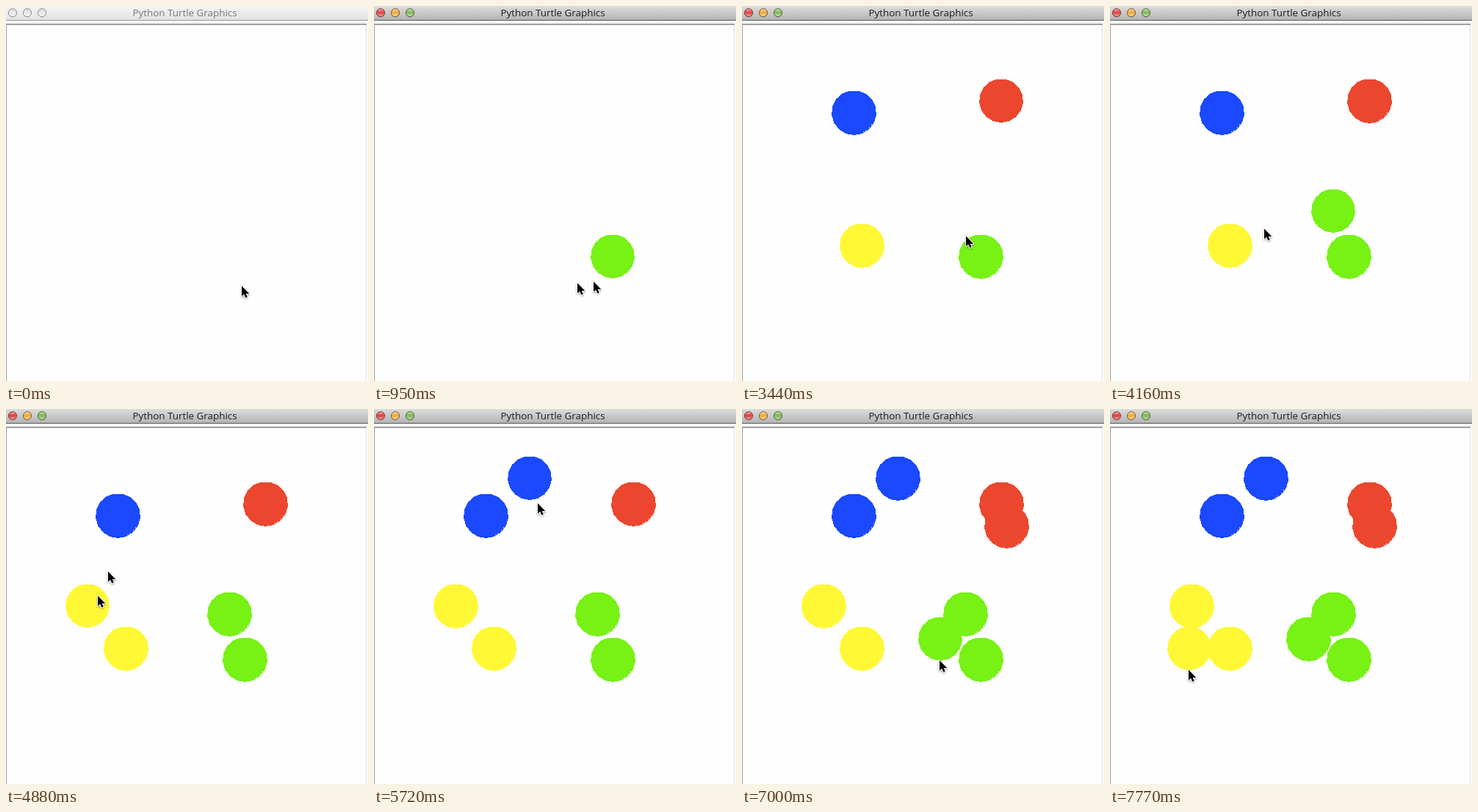
Animation of 493 by 511 pixels, one loop 8000 ms. Source, as an HTML page:

```html
<!DOCTYPE html>
<html lang="en">
<head>
<meta charset="utf-8">
<title>Python Turtle Graphics</title>
<style>
  html, body { margin: 0; width: 100%; height: 100%; overflow: hidden; background: #fefefe; }
  svg { display: block; }
  text { font: 13.4px "Open Sans", "Noto Sans", sans-serif; }
  #dots { shape-rendering: crispEdges; }
  .lamp { fill: url(#dull); stroke: #8e8e8e; }
  .active .lamp { fill: var(--lamp); stroke: rgba(60, 40, 30, .65); }
  .gloss { fill: url(#gloss); display: none; }
  .active .gloss { display: inline; }
  #bar { fill: url(#idle); }
  .active #bar { fill: url(#front); }
  #rim { fill: #9a9a9a; }
  .active #rim { fill: #5c5c5c; }
  #title { fill: #777; }
  .active #title { fill: #1c1c1c; }
  .arrow { stroke: #fff; stroke-width: 2; stroke-linejoin: round; paint-order: stroke;
    filter: drop-shadow(0 1px 1px rgba(0, 0, 0, .4)); }
</style>
</head>
<body>
<svg id="stage" width="493" height="511" viewBox="0 0 493 511">
  <defs>
    <linearGradient id="idle" x2="0" y2="1"><stop stop-color="#f5f5f5"/><stop offset="1" stop-color="#e2e2e2"/></linearGradient>
    <linearGradient id="front" x2="0" y2="1"><stop stop-color="#dcdcdc"/><stop offset="1" stop-color="#b4b4b4"/></linearGradient>
    <linearGradient id="dull" x2="0" y2="1"><stop stop-color="#dcdcdc"/><stop offset="1" stop-color="#f4f4f4"/></linearGradient>
    <linearGradient id="gloss" x2="0" y2="1">
      <stop stop-color="#fff" stop-opacity=".6"/><stop offset=".45" stop-color="#fff" stop-opacity="0"/>
      <stop offset="1" stop-color="#fff" stop-opacity=".5"/>
    </linearGradient>
  </defs>
  <rect id="bar" width="493" height="19"/>
  <rect id="rim" y="19" width="493" height="1"/>
  <rect y="20" width="493" height="4" fill="#f6f6f6"/>
  <path d="M0 24H491V26H1V511H0Z" fill="#a0a0a0"/>
  <rect x="490" y="26" width="1" height="485" fill="#dedede"/>
  <g id="lamps"></g>
  <text id="title" x="172.5" y="14">Python Turtle Graphics</text>
  <g id="dots"></g>
  <g id="cursors"></g>
</svg>
<script>
const LOOP = 8000, STEP = 60, ACTIVE_AT = 590, RADIUS = 30, SIDES = 17;
const COLORS = ['#77f214', '#fff835', '#1a49ff', '#ed462e'];

const glide = u => u < 0.5 ? 4 * u ** 3 : 1 - 4 * (1 - u) ** 3;
const flick = u => 1 - (1 - u) ** 2.5;

// Each click draws a dot; sag bends the cursor's way there.
const clicks = [
  { x: 325, y: 341, at: 650 },
  { x: 163, y: 326, at: 1420, sag: 14, ease: flick },
  { x: 152, y: 145, at: 2070 },
  { x: 353, y: 129, at: 2780 },
  { x: 304, y: 279, at: 3620, sag: 70 },
  { x: 111, y: 268, at: 4580 },
  { x: 212, y: 94, at: 5360, sag: -33, ease: flick },
  { x: 360, y: 159, at: 6250 },
  { x: 270, y: 313, at: 7000, sag: 58 },
  { x: 108, y: 326, at: 7770, sag: 25 }
];

const $ = id => document.getElementById(id);

function add(parent, name, attrs) {
  const el = document.createElementNS('http://www.w3.org/2000/svg', name);
  for (const key in attrs) el.setAttribute(key, attrs[key]);
  return parent.appendChild(el);
}

function polygon(cx, cy) {
  return Array.from({ length: SIDES }, (_, i) => {
    const a = i * 2 * Math.PI / SIDES;
    return [cx + RADIUS * Math.sin(a), cy + RADIUS * Math.cos(a)];
  }).join(' ');
}

['#dc4038', '#eda931', '#78b84c'].forEach((color, i) => {
  const ring = { cx: 9 + 20 * i, cy: 9.2, r: 5.6 };
  add($('lamps'), 'circle', { ...ring, class: 'lamp', style: `--lamp: ${color}` });
  add($('lamps'), 'circle', { ...ring, r: 5, class: 'gloss' });
});

// Link each click to the cursor's start point, timing, and drawn shapes.
let from = { x: 321, y: 382 };
let start = 120;
clicks.forEach((c, i) => {
  const color = COLORS[i % COLORS.length];
  c.ease = c.ease || glide;
  c.sag = c.sag || 0;
  c.from = from;
  c.start = i ? clicks[i - 1].at + (c.ease === flick ? 300 : 230) : start;
  c.to = from = { x: c.x - 1, y: c.y + RADIUS };
  c.fill = add($('dots'), 'polygon', { points: polygon(c.x, c.y), fill: color });
  c.line = add($('dots'), 'polygon', { points: polygon(c.x + 0.5, c.y + 0.5), fill: 'none', stroke: color });
});

const [cursor, ghost] = [0, 1].map(() => add($('cursors'), 'path', {
  class: 'arrow', d: 'M0 -.5V13.6L3.2 10.8L5.3 15.6L7.8 14.5L5.7 10H10.3Z'
}));

function place(el, { from, to, sag, ease }, u) {
  const e = ease(u);
  const x = from.x + (to.x - from.x) * e;
  const y = from.y + (to.y - from.y) * e + 4 * sag * e * (1 - e);
  el.setAttribute('transform', `translate(${Math.round(x)} ${Math.round(y)})`);
}

function show(el, on) {
  el.style.display = on ? '' : 'none';
}

function draw(t) {
  $('stage').classList.toggle('active', t >= ACTIVE_AT);

  // A dot gets its outline only once the next one is drawn.
  clicks.forEach((c, i) => {
    show(c.fill, t >= c.at);
    show(c.line, i + 1 < clicks.length && t >= clicks[i + 1].at);
  });

  const move = clicks.filter(c => t >= c.start).pop() || clicks[0];
  const step = t < move.start ? 0 : 1 + Math.floor((t - move.start) / STEP);
  const u = Math.min(1, step * STEP / (move.at - move.start));
  place(cursor, move, u);
  place(ghost, move, u / 2);
  show(ghost, move.ease === flick && step === 1);
}

const begin = performance.now();
function tick() {
  draw((performance.now() - begin) % LOOP);
  requestAnimationFrame(tick);
}
tick();
</script>
</body>
</html>
```
